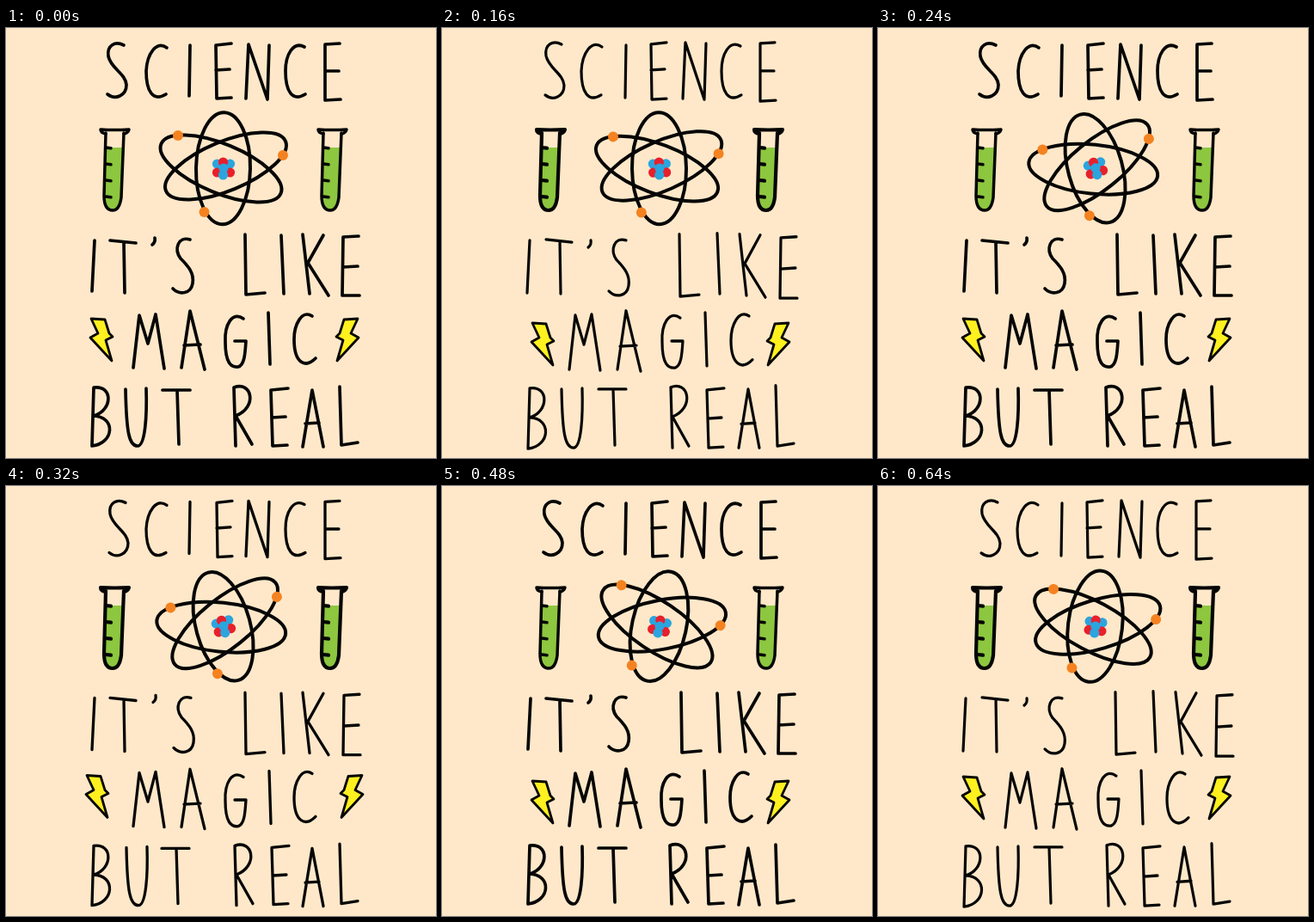
Write an HTML page with a canvas that moves like this. It is 500 px wide and 500 px high and loops after 0.68 s.

```html
<!DOCTYPE html>
<html lang="en">
<head>
<meta charset="utf-8">
<title>Science: it's like magic but real</title>
<style>
html, body { margin: 0; width: 100%; height: 100%; overflow: hidden; background: #ffe8c9; }
canvas { display: block; width: 500px; height: 500px; }
</style>
</head>
<body>
<canvas id="stage" width="500" height="500" role="img" aria-label="Science: it's like magic but real"></canvas>
<script>
const ctx = document.getElementById('stage').getContext('2d');
const STEP = 40, STEPS = 17;
const INK = '#050505', PAPER = '#ffe8c9', GREEN = '#8dc63f', YELLOW = '#fff01f';
const ORANGE = '#f58220', BLUE = '#2ca4de', RED = '#e8202c';

// Each letter: pen path, then its shift in the second and third hand-drawn take.
const letter = (path, second, third) => ({ path: new Path2D(path), shifts: [[0, 0], second, third] });

const science = [
  letter('M137 20C127 15 117 20 119 33C122 47 139 53 140 66C140 79 127 84 118 77', [2, 0], [2, 0]),
  letter('M187 23C175 14 164 30 163 50C163 74 171 86 186 77', [-1, 0], [0, 0]),
  letter('M214 20L213 79', [0, 1], [0, -1]),
  letter('M262 18L244 20L245 82L262 81M244 49L260 48', [-1, 0], [1, 0]),
  letter('M279 82L282 19L304 83L306 20', [1, -1], [0, -1]),
  letter('M347 22C334 15 325 31 325 50C325 74 333 86 348 77', [0, 0], [0, 0]),
  letter('M388 18L371 19L371 84L389 83M371 50L387 50', [-1, 0], [0, 0])
];
const itsLike = [
  letter('M103 247L100 306', [-1, 1], [0, 0]),
  letter('M121 247L151 250M137 249L138 308', [0, 0], [0, 0]),
  letter('M173 244Q174 249 170 252', [0, 4], [1, 0]),
  letter('M214 246C200 242 195 257 203 268C212 277 219 285 217 297C215 309 202 311 194 303', [0, 2], [1, 1]),
  letter('M278 240L279 310L301 308', [-2, 1], [0, 1]),
  letter('M320 241L323 309', [0, -1], [0, 1]),
  letter('M345 240L353 309M369 241L351 273L375 311', [1, 1], [0, 1]),
  letter('M410 242L392 243L391 311L411 311M392 278L409 277', [2, 2], [1, 1])
];
const magic = [
  letter('M148 395L155 334L165 367L174 333L184 396', [0, 1], [0, 0]),
  letter('M204 395L214 329L231 397M207 369L226 368', [0, 1], [0, 1]),
  letter('M276 338C263 329 254 345 255 365C255 390 262 395 270 394C277 392 278 380 279 364L266 364', [1, 0], [0, 1]),
  letter('M305 331L307 391', [1, 1], [1, 1]),
  letter('M356 335C344 327 335 345 335 362C335 390 348 396 360 384', [1, 1], [0, 0])
];
const butReal = [
  letter('M102 418L100 486M102 418C125 415 124 445 102 451C128 452 126 483 100 486', [0, 2], [0, 1]),
  letter('M139 420C140 470 143 486 153 486C162 486 164 450 163 419', [0, 1], [1, 1]),
  letter('M182 421L214 421M199 421L201 484', [0, 0], [-1, 1]),
  letter('M265 418L267 486M265 418C286 410 293 441 267 451L286 484', [1, 1], [1, 1]),
  letter('M328 419L308 421L310 486L327 485M309 453L325 452', [0, 1], [1, 0]),
  letter('M345 487L356 421L369 487M348 460L364 459', [0, 0], [0, 1]),
  letter('M388 417L390 485L409 482', [0, 0], [0, 0])
];
const rows = [
  { middle: 51, letters: science },
  { middle: 277, letters: itsLike },
  { middle: 364, letters: magic },
  { middle: 452, letters: butReal }
];
const takes = [
  { stretch: 1, ink: 3.7, tubeInk: 3.5 },
  { stretch: 1.035, ink: 3.2, tubeInk: 4.2 },
  { stretch: 1.02, ink: 3.3, tubeInk: 4.2 }
];

const tubeBody = new Path2D('M116 122L114 195Q114 212 124 212Q132 212 134 197L137 122');
const tubeFill = new Path2D('M116 139L114 195Q114 212 124 212Q132 212 134 197L136 139Z');
const tubeRim = new Path2D('M116 123Q110 122 110 118Q126 119 143 118Q142 122 137 123');
const bolt = new Path2D('M99 338L115 339L120 355L124 359L116 363L123 387L98 360L107 355Z');
const boltShake = [[0, 0], [0, 0], [6, 5], [-5, -1.5], [6, 5]];

// Clockwise swing of the atom in degrees.
const atomSwing = [0, -0.4, -0.8, -1.1, -1.5, -9.5, -16.5, -18, -16.5, -9.5, -1.5, 5.5, 11.5, 14, 13.5, 10.5, 5.8];
const orbits = [[0, 0.2, 31.5, 65, 1], [-2.5, 0.5, 75.3, 28.5, 22.5], [3, -2.5, 75.3, 28.5, -22.5]];
const electrons = [[-52.5, -38], [69.5, -15], [-22, 51]];
const nucleons = [
  [-7, -5, BLUE], [8, -5, BLUE], [0, -7, RED], [-7, 5, RED],
  [8, 5, RED], [0, 8, BLUE], [0.5, 0, BLUE]
];

function pen(width) {
  ctx.strokeStyle = INK;
  ctx.lineWidth = width;
  ctx.lineCap = ctx.lineJoin = 'round';
}

function shifted(x, y, draw) {
  ctx.save();
  ctx.translate(x, y);
  draw();
  ctx.restore();
}

function dot(x, y, r, color) {
  ctx.fillStyle = color;
  ctx.beginPath();
  ctx.arc(x, y, r, 0, Math.PI * 2);
  ctx.fill();
}

function drawLettering(take) {
  const { stretch, ink } = takes[take];
  pen(ink);
  for (const { middle, letters } of rows) {
    for (const { path, shifts } of letters) {
      const [x, y] = shifts[take];
      shifted(x, y + middle * (1 - stretch), () => {
        ctx.scale(1, stretch);
        ctx.stroke(path);
      });
    }
  }
}

function drawTube(take) {
  pen(takes[take].tubeInk);
  ctx.fillStyle = GREEN;
  ctx.fill(tubeFill);
  ctx.stroke(tubeBody);
  ctx.stroke(tubeRim);
  ctx.beginPath();
  for (let i = 0; i < 4; i++) {
    const y = 139 + i * 19;
    ctx.moveTo(116, y);
    ctx.lineTo(122, y + 0.7);
  }
  ctx.stroke();
}

function drawAtom(degrees) {
  ctx.save();
  ctx.translate(252.5, 163);
  ctx.rotate(degrees * Math.PI / 180);
  pen(4);
  for (const [x, y, rx, ry, tilt] of orbits) {
    ctx.beginPath();
    ctx.ellipse(x, y, rx, ry, tilt * Math.PI / 180, 0, Math.PI * 2);
    ctx.stroke();
  }
  for (const [x, y, color] of nucleons) dot(x, y, 5.6, color);
  for (const [x, y] of electrons) dot(x, y, 6, ORANGE);
  ctx.restore();
}

function drawBolt() {
  pen(2.8);
  ctx.fillStyle = YELLOW;
  ctx.fill(bolt);
  ctx.stroke(bolt);
}

function drawBolts([x, y]) {
  shifted(x, y, drawBolt);
  ctx.save();
  ctx.translate(508, 0);
  ctx.scale(-1, 1);
  shifted(x, y, drawBolt);
  ctx.restore();
}

function render(now) {
  const step = Math.floor(now / STEP) % STEPS;
  const take = step % takes.length;
  ctx.fillStyle = PAPER;
  ctx.fillRect(0, 0, 500, 500);
  drawLettering(take);
  drawTube(take);
  shifted(253, 0, () => drawTube(take));
  drawAtom(atomSwing[step]);
  drawBolts(boltShake[step % boltShake.length]);
}

const start = performance.now();
function tick() {
  render(performance.now() - start);
  requestAnimationFrame(tick);
}
tick();
</script>
</body>
</html>
```
